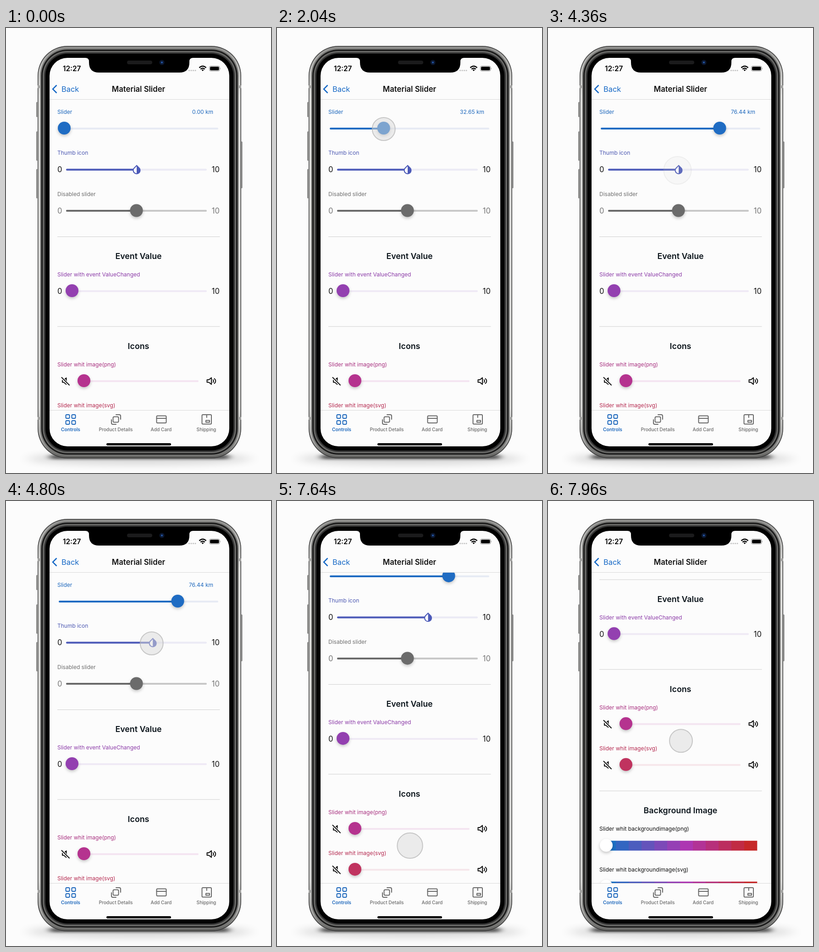
An HTML page for the animation above (8000 ms loop, 578x969 px).

```html
<!DOCTYPE html>
<html lang="en">
<head>
<meta charset="utf-8">
<title>Material Slider</title>
<style>
  html, body { margin: 0; width: 100%; height: 100%; overflow: hidden; background: #fcfcfc; }
  svg { display: block; font-family: Inter, Roboto, sans-serif; }
  .label { font-size: 12px; }
  .num { font-size: 16.6px; fill: #111; }
  .head { font-size: 17.8px; font-weight: 600; fill: #0b141b; text-anchor: middle; }
  .tab { font-size: 10.2px; font-weight: 500; fill: #6a6a6a; text-anchor: middle; }
  .end { text-anchor: end; }
  .icon { fill: none; stroke-width: 2; stroke-linejoin: round; stroke-linecap: round; }
  .thumb { filter: drop-shadow(0 3px 3px rgba(0, 0, 0, .22)); }
</style>
</head>
<body>
<svg width="578" height="969" viewBox="0 0 578 969">
  <defs>
    <linearGradient id="steel" x1="0" y1="0" x2="0" y2="1">
      <stop offset="0" stop-color="#8f8f8d"/>
      <stop offset=".06" stop-color="#c4c4c2"/>
      <stop offset=".12" stop-color="#e4e4e2"/>
      <stop offset=".88" stop-color="#dededc"/>
      <stop offset=".96" stop-color="#a2a2a0"/>
      <stop offset="1" stop-color="#5e5e5c"/>
    </linearGradient>
    <linearGradient id="button">
      <stop offset="0" stop-color="#444"/>
      <stop offset=".5" stop-color="#d5d5d3"/>
      <stop offset="1" stop-color="#555"/>
    </linearGradient>
    <filter id="soft" x="-20%" y="-200%" width="140%" height="500%"><feGaussianBlur stdDeviation="14 8"/></filter>
    <filter id="tight" x="-20%" y="-200%" width="140%" height="500%"><feGaussianBlur stdDeviation="8 2.5"/></filter>
    <clipPath id="view"><rect x="95" y="156" width="392" height="676"/></clipPath>
    <path id="drop" d="M17.66 7.93 12 2.27 6.34 7.93c-3.12 3.12-3.12 8.19 0 11.31a8 8 0 0 0 11.32 0c3.12-3.12 3.12-8.19 0-11.31z"/>
    <g id="mute" class="icon" stroke="#111">
      <path d="M3 6.5H6L11.5 2V16L6 11.5H3Z"/>
      <path d="M1 1 18 18" stroke="#fcfcfc" stroke-width="5"/>
      <path d="M1.5 1 18 17.500"/>
    </g>
    <g id="loud" class="icon" stroke="#111">
      <path d="M1 6H5L10.500 1.500V16L5 11.500H1Z"/>
      <path d="M14 6Q16.500 8.750 14 11.500M17 3.500Q22.500 8.750 17 14"/>
    </g>
  </defs>

  <rect width="578" height="969" fill="#fcfcfc"/>
  <ellipse cx="291" cy="938" rx="245" ry="14" fill="#000" opacity=".13" filter="url(#soft)"/>
  <rect x="95" y="929" width="392" height="10" rx="5" opacity=".6" filter="url(#tight)"/>
  <g id="phone"></g>

  <g id="content" clip-path="url(#view)"><g id="page"></g></g>

  <path d="M95 155.500H487M95 832.500H487" stroke="#d9d9d9"/>
  <path d="M173 65Q181 65 181 73V75Q181 97 203 97H378Q400 97 400 75V73Q400 65 408 65Z"/>
  <rect x="264" y="71" width="55" height="8" rx="4" fill="#1b1b1c"/>
  <circle cx="340" cy="75" r="5.500" fill="#0c1830"/>
  <circle cx="340" cy="75" r="2" fill="#2458a8"/>

  <text x="124" y="94" font-size="15.4" font-weight="600">12:27</text>
  <g fill="#c4c4c4">
    <circle cx="399.500" cy="92.500" r="1.600"/><circle cx="404" cy="92.500" r="1.600"/>
    <circle cx="408.500" cy="92.500" r="1.600"/><circle cx="413" cy="92.500" r="1.600"/>
  </g>
  <g fill="none" stroke="#000" stroke-width="2.500">
    <path d="M421.500 86.500Q429 79.500 436.500 86.500M424.300 89.700Q429 85.300 433.700 89.700"/>
    <path d="M426.500 91.200Q429 89.500 431.500 91.200L429 94Z" fill="#000" stroke="none"/>
  </g>
  <rect x="443.500" y="82.800" width="22.500" height="11" rx="3.300" fill="none" stroke="#8d8d8d"/>
  <rect x="445" y="84.300" width="19.500" height="8" rx="2"/>
  <path d="M467.300 86.500Q469 88.300 467.300 90.200Z" fill="#8d8d8d"/>

  <path d="M110.500 124.500 102 133 110.500 141.500" fill="none" stroke="#1769c6" stroke-width="2.500"/>
  <text x="121" y="139" font-size="16.4" fill="#1769c6">Back</text>
  <text x="289" y="139" font-size="16.7" font-weight="600" text-anchor="middle" fill="#111">Material Slider</text>

  <g class="icon" stroke="#1c67bc">
    <rect x="130.500" y="842" width="8" height="8" rx="2"/><rect x="143.500" y="842" width="8" height="8" rx="2"/>
    <rect x="130.500" y="855" width="8" height="8" rx="2"/><rect x="143.500" y="855" width="8" height="8" rx="2"/>
  </g>
  <g class="icon" stroke="#686868">
    <rect x="233.500" y="846.500" width="12" height="12" rx="2.500"/>
    <path d="M240 842H247Q250 842 250 845V852M230 853V860Q230 863 233 863H240"/>
    <rect x="328.500" y="844.500" width="21" height="15.500" rx="2"/><path d="M328.500 850H349.500"/>
    <rect x="427.500" y="842" width="20.500" height="20.500" rx="2"/>
    <path d="M437.800 842V848M436 854.500H444V858.500H436Z"/>
  </g>
  <text class="tab" x="141" y="878" style="fill:#1c67bc;font-weight:600">Controls</text>
  <text class="tab" x="239.500" y="878">Product Details</text>
  <text class="tab" x="338.500" y="878">Add Card</text>
  <text class="tab" x="437" y="878">Shipping</text>
  <rect x="219" y="904" width="141" height="5" rx="2.500"/>

  <circle id="touch" fill="rgba(220,220,220,.5)" stroke="rgba(180,180,180,.7)" stroke-width="2"/>
</svg>
<script>
const $ = id => document.getElementById(id);
const clamp = v => Math.min(1, Math.max(0, v));
const ramp = (t, a, b) => clamp((t - a) / (b - a));
const ease = u => u * u * (3 - 2 * u);

// Phone body: buttons, antenna marks and nested shells
const button = (x, y, h) => `<rect x="${x}" y="${y}" width="5" height="${h}" rx="1.5" fill="url(#button)"/>`;
const shell = (inset, fill) =>
  `<rect x="${69 + inset}" y="${39 + inset}" width="${444 - 2 * inset}" height="${898 - 2 * inset}" rx="${65 - inset}" fill="${fill}"/>`;
$('phone').innerHTML =
  button(66, 161, 33) + button(66, 225, 64) + button(66, 307, 64) + button(510.5, 247, 102) +
  [[0, '#333'], [1.5, 'url(#steel)'], [5.5, '#777775'], [8, '#191919'], [11, '#696967'],
   [14, '#343434'], [17, '#000']].map(s => shell(...s)).join('') +
  [[69, 125], [507, 125], [69, 847], [507, 847]].map(([x, y]) =>
    `<rect x="${x}" y="${y}" width="6" height="6" fill="#a5a5a3"/>`).join('') +
  '<rect x="95" y="65" width="392" height="846" rx="39" fill="#fcfcfc"/>';

// Scrolling page
const label = (y, text, color) => `<text class="label" x="112" y="${y}" fill="${color}">${text}</text>`;
const head = (y, text) => `<text class="head" x="289" y="${y}">${text}</text>`;
const rule = y => `<path d="M112 ${y}H466.5" stroke="#cfcfcf"/>`;
const line = (x1, x2, y, color, id = '') =>
  `<path ${id && `id="${id}"`} d="M${x1 + 2} ${y}H${x2 - 2}" stroke="${color}" stroke-width="4" stroke-linecap="round"/>`;
const thumb = (x, y, color, id = '') =>
  `<circle class="thumb" ${id && `id="${id}"`} cx="${x}" cy="${y}" r="14" fill="${color}"/>`;
const ends = (y, color = '#111') =>
  `<g style="fill:${color}"><text class="num" style="fill:inherit" x="112" y="${y}">0</text>` +
  `<text class="num end" style="fill:inherit" x="466" y="${y}">10</text></g>`;
const volume = (y, color, track) =>
  `<use href="#mute" x="120" y="${y - 9}"/><use href="#loud" x="437.5" y="${y - 9}"/>` +
  line(156, 420, y, track) + thumb(170, y - 1, color);

const mix = (a, b, u) => `rgb(${a.map((v, i) => Math.round(v + (b[i] - v) * u))})`;
const blue = [27, 112, 196], violet = [173, 54, 178], red = [198, 40, 40];
const bar = y => Array.from({ length: 12 }, (_, i) =>
  `<rect x="${120 + i * 28}" y="${y}" width="28.3" height="21.5" fill="${
    i < 6 ? mix(blue, violet, i / 6) : mix(violet, red, (i - 6) / 5)}"/>`).join('') +
  thumb(127, y + 10, '#fff');

$('page').innerHTML =
  label(187, 'Slider', '#1c67bc') +
  '<text id="km" class="label end" x="452" y="187" fill="#1c67bc"></text>' +
  line(115, 463, 219, '#e7ebf4') + line(115, 127, 219, '#1f6cc3', 'fillA') + thumb(127, 218, '#1f6cc3', 'thumbA') +
  label(276, 'Thumb icon', '#4c58b2') + ends(314) +
  line(131, 438, 308.5, '#ebeaf5') + line(131, 285, 308.5, '#4c5ab8', 'fillB') +
  `<g id="thumbB"><use href="#drop" fill="#4c5ab8"/>
    <path d="M12 19.59a6 6 0 0 1-4.24-10.24L12 5.1z" fill="#fff"/></g>` +
  label(366, 'Disabled slider', '#6f6f6f') + ends(404, '#777') +
  line(131, 438, 398, '#c8c8c8') + line(131, 285, 398, '#6a6a6a') + thumb(284.5, 397.5, '#6b6b6b') +
  rule(454.5) + head(503, 'Event Value') +
  label(541, 'Slider with event ValueChanged', '#8c3ca8') + ends(579) +
  line(131, 438, 573, '#efeaf5') + thumb(144, 572, '#9340b0') +
  rule(650) + head(699, 'Icons') +
  label(737, 'Slider whit image(png)', '#a8307f') + volume(769, '#b5338f', '#f4e5f1') +
  label(826, 'Slider whit image(svg)', '#b52a50') + volume(858, '#c0335f', '#f6e7eb') +
  rule(914.5) + head(963.5, 'Background Image') +
  label(1001.5, 'Slider whit backgroundimage(png)', '#111') + bar(1023) +
  label(1090.5, 'Slider whit backgroundimage(svg)', '#111') + bar(1112);

// Touch gestures: press and release times with a position for each moment
const kmAt = t => 76.44 * ease(ramp(t, 1680, 2480));
const blueX = t => 127 + 3.238 * kmAt(t);
const dropX = t => 285 + 44.5 * ease(ramp(t, 4420, 4960));
const scrollAt = t => {
  const u = t - 7540;
  if (u <= 0) return 0;
  if (u < 100) return .0054 * u * u;
  const v = u - 100;
  return 54 + 1.08 * v - .00114 * v * v;
};
const gestures = [
  { from: 1570, to: 2600, at: t => [blueX(t), 220] },
  { from: 4340, to: 5000, at: t => [dropX(t) - 2.5, 310] },
  { from: 7420, to: 8100, at: t => [290, 812 - 6.5 * ramp(t, 7500, 7600) - scrollAt(t)] }
];

function draw(t) {
  const a = blueX(t), b = dropX(t);
  $('km').textContent = kmAt(t).toFixed(2) + ' km';
  $('thumbA').setAttribute('cx', a);
  $('fillA').setAttribute('d', `M117 219H${a}`);
  $('fillB').setAttribute('d', `M133 308.500H${b}`);
  $('thumbB').setAttribute('transform', `translate(${b - 12.7} 295.500) scale(1.06)`);
  $('page').setAttribute('transform', `translate(0 ${-scrollAt(t)})`);

  const g = gestures.find(g => t >= g.from && t < g.to);
  const touch = $('touch');
  touch.setAttribute('opacity', g ? Math.min(ramp(t, g.from, g.from + 80), 1 - ramp(t, g.to - 50, g.to)) : 0);
  if (!g) return;
  const [x, y] = g.at(t);
  touch.setAttribute('cx', x);
  touch.setAttribute('cy', y);
  touch.setAttribute('r', 30 - 5 * ramp(t - g.from, 100, 360));
}

const start = performance.now();
function tick() {
  draw((performance.now() - start) % 8000);
  requestAnimationFrame(tick);
}
draw(0);
requestAnimationFrame(tick);
</script>
</body>
</html>
```
